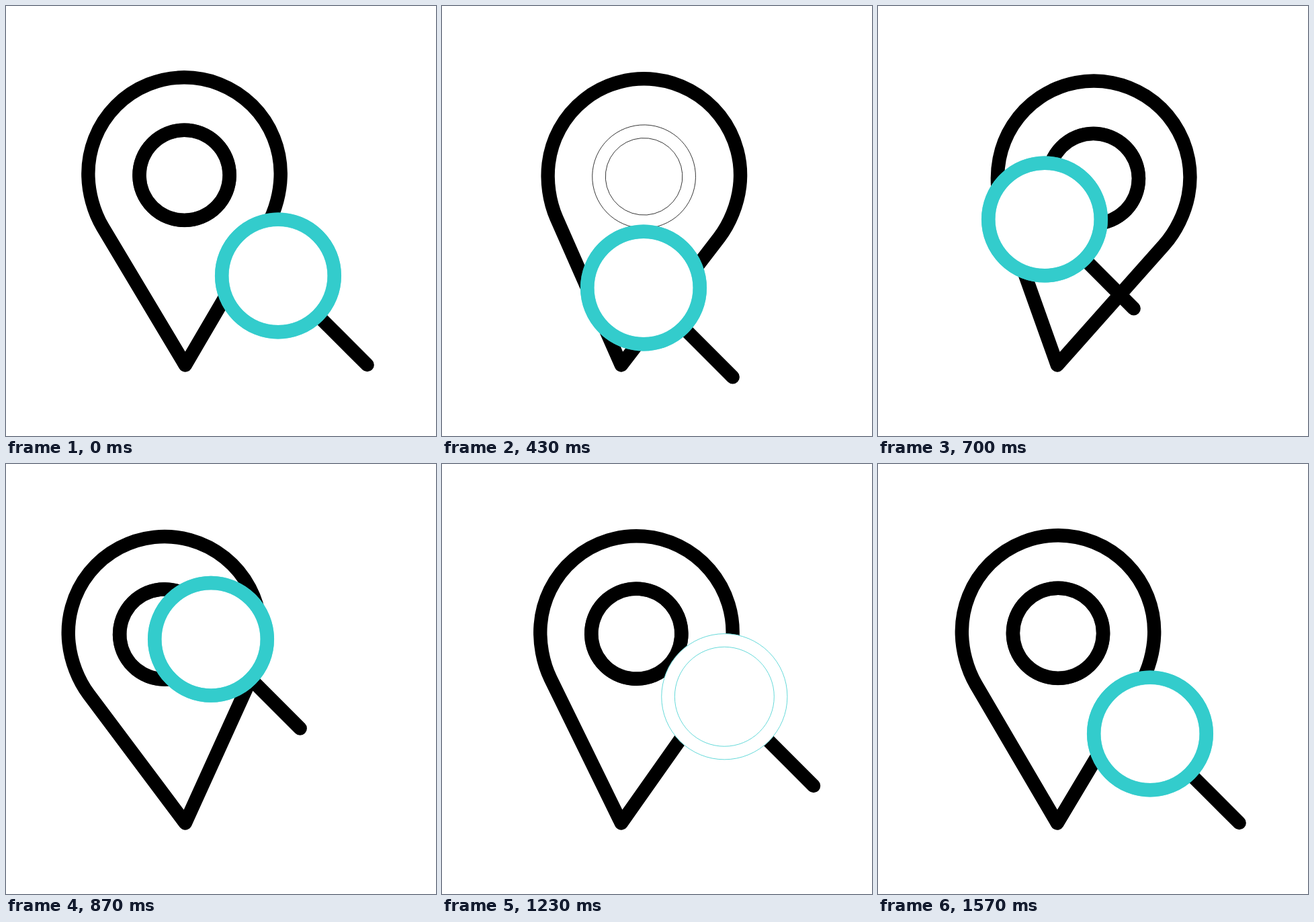
Animation, 640 px wide and 640 px high, one loop 1670 ms. Source, as an HTML page:

```html
<!DOCTYPE html>
<html lang="en">
<head>
<meta charset="utf-8">
<title>Location search</title>
<style>
  html, body { margin: 0; width: 100%; height: 100%; overflow: hidden; background: #fff; }
  svg { display: block; width: 100%; height: 100%; }
  .line { fill: none; stroke: #000; stroke-width: 20.4; stroke-linecap: round; stroke-linejoin: round; }
  .ring { stroke: var(--ink); stroke-width: 20.4; fill: #fff; }
  .edge { stroke: var(--ink); stroke-width: .75; fill: none; }
  .blank .ring { stroke: #fff; }
  #eye { --ink: #000; }
  #lens { --ink: #33cccc; }
</style>
</head>
<body>
<svg viewBox="0 0 640 640">
  <!-- origin at the tip of the pin -->
  <g id="pin">
    <path class="line" d="M0 0 L-122 -206 C-135.5 -229 -143.2 -258 -143.2 -285
      A143.2 143.2 0 0 1 143.2 -285 C143.2 -258 135.5 -229 122 -206 Z"/>
    <g id="eye" transform="translate(0 -282.7)">
      <circle class="ring" r="67.1"/>
      <circle class="edge" r="76.9"/>
      <circle class="edge" r="57.3"/>
    </g>
  </g>
  <!-- origin at the centre of the lens -->
  <g id="glass">
    <path class="line" d="M60 60 L132.7 132.7"/>
    <g id="lens">
      <circle class="ring" r="83.8"/>
      <circle class="edge" r="93.6"/>
      <circle class="edge" r="74"/>
    </g>
  </g>
</svg>
<script>
  const LOOP = 1670, LAST = 47; // 30 steps per second, then a short hold

  // Turning points of the dying swing: step, degrees
  const swing = [[-0.6, 0], [7.8, -17.35], [16.55, 20.5], [28.4, -9.4], [39, 6], [48.1, 0]];

  // The glass circles once round a centre: step, degrees, radius
  const orbit = [
    [0, 38.7, 93.5], [8, 59.7, 83.4], [13, 112.7, 82.9], [21, 196.9, 87.8],
    [31, 305.1, 85.2], [37, 362.1, 88.4], [LAST, 398.7, 93.5]
  ];

  // Slope of column c at key i: level at the ends and wherever the value turns
  function slope(keys, i, c) {
    if (i === 0 || i === keys.length - 1) return 0;
    const [p, q, r] = keys.slice(i - 1, i + 2);
    const before = q[0] - p[0], after = r[0] - q[0];
    const a = (q[c] - p[c]) / before, b = (r[c] - q[c]) / after;
    return a * b <= 0 ? 0 : (a * after + b * before) / (before + after);
  }

  // Cubic Hermite curve through the keys
  function at(keys, step, c = 1) {
    let i = 0;
    while (i < keys.length - 2 && step >= keys[i + 1][0]) i++;
    const p = keys[i], q = keys[i + 1];
    const d = q[0] - p[0], u = (step - p[0]) / d, w = 1 - u;
    return p[c] * w * w * (1 + 2 * u) + q[c] * u * u * (1 + 2 * w)
      + d * u * w * (slope(keys, i, c) * w - slope(keys, i + 1, c) * u);
  }

  const el = id => document.getElementById(id);
  const pin = el('pin'), glass = el('glass'), eye = el('eye'), lens = el('lens');

  function draw(ms) {
    // Steps begin on whole hundredths of a second
    const tick = Math.floor(ms / 10);
    const step = Math.min(LAST, Math.floor((tick + 0.5) * 0.3));

    pin.setAttribute('transform', `translate(266.8 534.5) rotate(${at(swing, step)})`);

    const angle = at(orbit, step) * Math.PI / 180, radius = at(orbit, step, 2);
    const x = 332 + radius * Math.cos(angle), y = 343 + radius * Math.sin(angle);
    glass.setAttribute('transform', `translate(${x} ${y})`);

    // Each ring flashes white for a single step
    eye.classList.toggle('blank', step === 13);
    lens.classList.toggle('blank', step === 37);
  }

  const start = performance.now();
  function loop() {
    draw((performance.now() - start) % LOOP);
    requestAnimationFrame(loop);
  }
  draw(0);
  requestAnimationFrame(loop);
</script>
</body>
</html>
```
